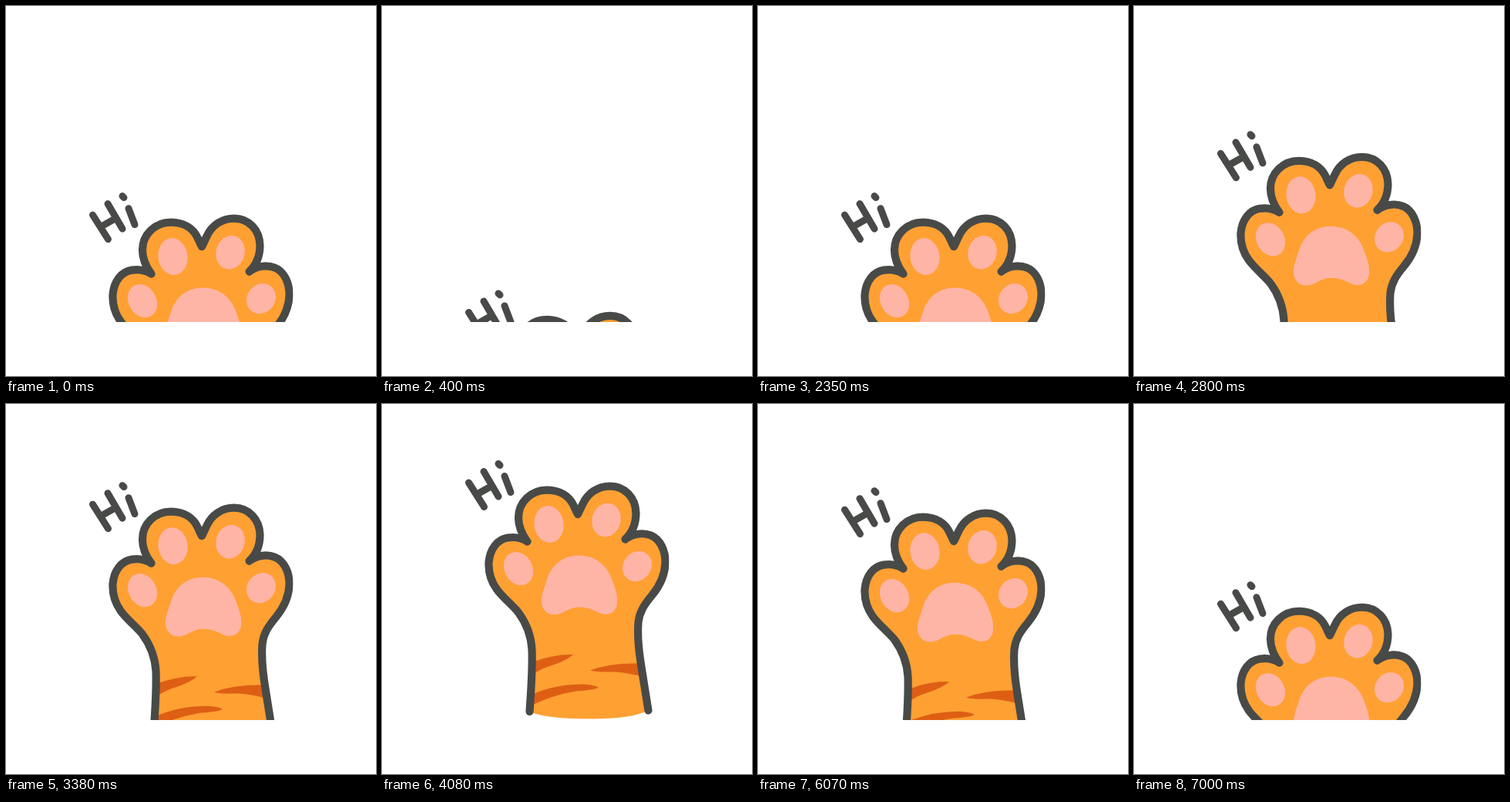
An HTML page for the animation above (7.07 s loop, 480x480 px).

```html
<!DOCTYPE html>
<html lang="en">
<head>
<meta charset="utf-8">
<title>Waving paw</title>
<style>
  html, body { margin: 0; width: 100%; height: 100%; overflow: hidden; background: #fff; }
  svg { display: block; width: 100%; height: 100%; }
  .ink { fill: none; stroke: #484a47; stroke-width: 10.2; stroke-linecap: round; stroke-linejoin: round; }
  .fur { fill: #ffa033; }
  .pad { fill: #ffb5a6; }
  .stripe { fill: #de5f14; }
</style>
</head>
<body>
<svg viewBox="0 0 480 480">
  <defs>
    <clipPath id="window"><rect x="105" y="0" width="267.5" height="410"/></clipPath>
    <path id="outline" d="M191.500 398.500 C193 375 195.500 345 194.500 318 C193.500 301 188 285 177 270
      C170 261 157 251 149 240 C141 229 138 217 138.500 205 C140 187 150 175 163 173
      C173 171.500 181 173 188.500 178 C181 168 177 159 177 147 C177 127 193 111 214 111
      C232 111 243 120 248 130 C250 134 252 139 254 142.500 C256 139 258 134 260.500 129
      C267 115 280 106 296 106 C315 106 329 121 329.500 141 C329.500 156 324 167 315.500 175
      C325 168 338 165.500 349 170 C361 175 368 190 367.500 206 C367 221 360 236 350 248
      C340 260 334 269 332.500 283 C331 305 334 325 337.500 347 C340.500 366 343 382 345.500 397"/>
  </defs>
  <g clip-path="url(#window)">
    <g id="paw">
      <use href="#outline" class="fur"/>
      <path class="fur" d="M192 385 V399 Q215 408 270 408 Q325 408 345 397 V385Z"/>
      <g class="stripe">
        <path d="M196 334 Q222 324 248 324.500 Q240 332 222 338 Q208 342 196 350Z"/>
        <path d="M270 345 Q297 335 335 336 V352.500 Q312 346 290 347 Q277 347 270 345Z"/>
        <path d="M195 376 Q225 363 262 363 Q282 365 280 368 Q270 371 252 372 Q222 377 195 390Z"/>
      </g>
      <use href="#outline" class="ink"/>
      <g class="pad">
        <ellipse rx="18" ry="22.500" transform="translate(177 213) rotate(-28)"/>
        <ellipse rx="19" ry="24" transform="translate(216.500 155.500) rotate(-8)"/>
        <ellipse rx="18.500" ry="22" transform="translate(291 150) rotate(15)"/>
        <ellipse rx="18" ry="20.500" transform="translate(331 210) rotate(38)"/>
        <path d="M255.500 196 C278 196 293 210 299 229 C303 240 306 248 305 258
          C304 270 293 275 283 271 C273 266 266 263 256 263 C246 263 239 268 231 271.500
          C217 276 207 268 207 255 C207 246 211 237 214.500 226 C220 209 234 196 255.500 196Z"/>
      </g>
      <g class="ink" style="stroke-width:9">
        <path d="M112.500 101.500 L132.500 133 M132 87 L151 119.500 M122.500 117 L142 106"/>
        <path d="M151 77 L153 79 M159 93 L167 114"/>
      </g>
    </g>
  </g>
</svg>
<script>
  const LOOP = 7070, MIDDLE = 170, QUARTER = 22.5, TOP = 22;
  const HIDDEN = 400;
  const paw = document.getElementById('paw');

  // Sine sweep over poses: -22 is fully sunk, 0 halfway, 22 fully raised.
  const drop = pose => MIDDLE * (1 - Math.sin(Math.PI / 2 * pose / QUARTER)) - 0.4;
  const hold = pose => pose <= 0 ? 30 : pose <= 10 ? 70 : 100;

  const steps = [];
  let clock = 0;
  const add = (y, duration) => {
    steps.push({ y, end: clock += duration });
  };

  add(drop(0), 70);
  for (let pose = -1; pose >= -20; pose--) add(drop(pose), hold(pose));
  add(HIDDEN, 1750 - clock);
  for (let pose = -20; pose < TOP; pose++) add(drop(pose), hold(pose));
  add(drop(TOP), 5270 - clock);
  for (let pose = TOP - 1; pose >= 1; pose--) add(drop(pose), hold(pose));

  const start = performance.now();
  function draw(now) {
    const time = Math.max(0, now - start) % LOOP;
    const step = steps.find(s => time < s.end) || steps[0];
    paw.setAttribute('transform', `translate(0 ${step.y.toFixed(2)})`);
    requestAnimationFrame(draw);
  }
  draw(start);
</script>
</body>
</html>
```
